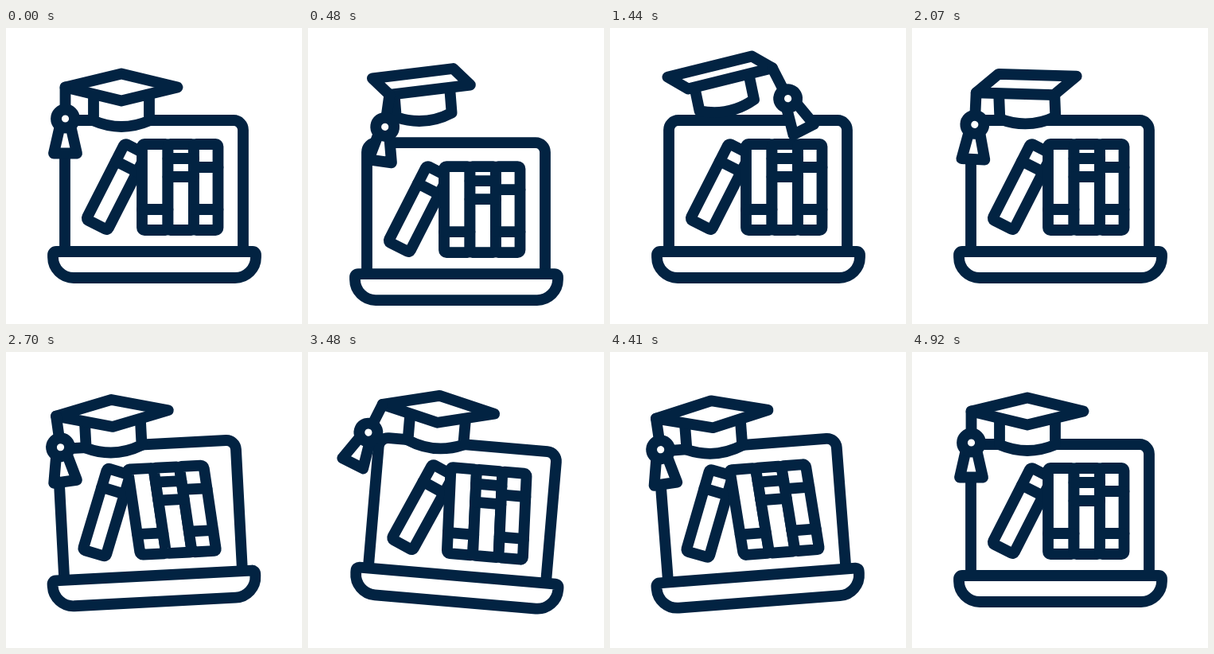
Recreate the animation shown at these times as an HTML page. Size 372 by 372 pixels, loop 5.4 s.

```html
<!DOCTYPE html>
<html>
<head>
<meta charset="utf-8">
<style>
  html, body { margin: 0; height: 100%; overflow: hidden; background: #fff; }
  svg { display: block; width: 100vw; height: 100vh; }
  g { fill: #fff; stroke: #022342; stroke-width: 13.8; stroke-linejoin: round; stroke-linecap: round; }
</style>
</head>
<body>
<svg viewBox="0 0 372 372">
  <g id="scene">
    <g id="laptop">
      <path d="M74 280V128a12 12 0 0 1 12-12H286a12 12 0 0 1 12 12V280"/>
      <path d="M63 281H310a4 4 0 0 1 4 4v3a26 26 0 0 1-26 26H85a26 26 0 0 1-26-26v-3a4 4 0 0 1 4-4z"/>
      <g id="lean">
        <rect x="-30" y="-107" width="30" height="107" rx="3"/>
        <path d="M-30-82H0"/>
      </g>
      <g id="books">
        <rect x="171" y="-108" width="32.5" height="108" rx="3"/>
        <rect x="203.5" y="-108" width="32.5" height="108" rx="3"/>
        <rect x="236" y="-108" width="30.5" height="108" rx="3"/>
        <path d="M171-26h32.5M203.5-90H236M203.5-67H236M236-79h30.5M236-26h30.5"/>
      </g>
    </g>
    <g id="cap">
      <path d="M-35 10V42Q0 57 35 42V10"/>
      <polygon id="board"/>
      <g id="tassel">
        <path id="cord"/>
        <g id="bob">
          <path d="M-7 50H7L14.5 83H-14.5z"/>
          <circle cy="39.5" r="11.5"/>
        </g>
      </g>
    </g>
  </g>
</svg>
<script>
const LOOP = 5400, STEP = 30;
const TOSS_END = 2400, BEAT = 600, ROCK = 6;
// Tassel swings: start, end, angle at the middle.
const SWINGS = [[0, 950, 8], [950, 1930, -27], [1930, 2400, 4],
  [2400, 3000, -5], [3000, 3950, 22], [3950, 4920, -4]];

const el = id => document.getElementById(id);
const place = (id, transform) => el(id).setAttribute('transform', transform);
const clamp = x => Math.min(1, Math.max(0, x));
const ease = x => (1 - Math.cos(Math.PI * clamp(x))) / 2;
const bump = (t, from, to) => Math.sin(Math.PI * clamp((t - from) / (to - from))) ** 2;

function draw(t) {
  const toss = bump(t, 0, TOSS_END);
  const swing = SWINGS.reduce((sum, [from, to, angle]) => sum + angle * bump(t, from, to), 0);

  // The laptop rocks left, right, left and back; the books slump while it does.
  const beat = (t - TOSS_END) / BEAT;
  const tilt = ROCK * (-ease(beat) + 2 * ease(beat - 1) - 2 * ease(beat - 2) + ease(beat - 3));
  const slump = 0.4 * tilt - 4.2 * ease(2 * beat) * ease(4 - beat);

  place('scene', `rotate(${tilt} 186 297)`);
  place('laptop', `translate(0 ${31 * bump(t, 0, 2 * BEAT)})`);
  place('lean', `translate(127.5 254) rotate(${27 + slump * 1.35})`);
  place('books', `translate(0 254) skewX(${-slump})`);

  // The board is a square turning on a flat ellipse; the tassel hangs from its first corner.
  const spin = Math.PI * (1 - 0.9 * toss);
  const corners = [0, 1, 2, 3].map(i => {
    const a = spin + i * Math.PI / 2;
    return [(70.5 + 9 * toss) * Math.cos(a), (17 - 3 * toss) * Math.sin(a)];
  });
  el('board').setAttribute('points', corners.join(' '));
  place('cap', `translate(${145 - 7.5 * toss} ${74.5 - 20.5 * toss}) rotate(${-13 * toss})`);
  place('tassel', `translate(${corners[0]}) rotate(${13 * toss + swing})`);
  place('bob', `translate(0 ${4 * toss})`);
  el('cord').setAttribute('d', `M0 0V${30 + 4 * toss}`);
}

const start = performance.now();
function tick() {
  const t = (performance.now() - start) % LOOP;
  draw(Math.floor(t / STEP) * STEP);
  requestAnimationFrame(tick);
}
tick();
</script>
</body>
</html>
```
